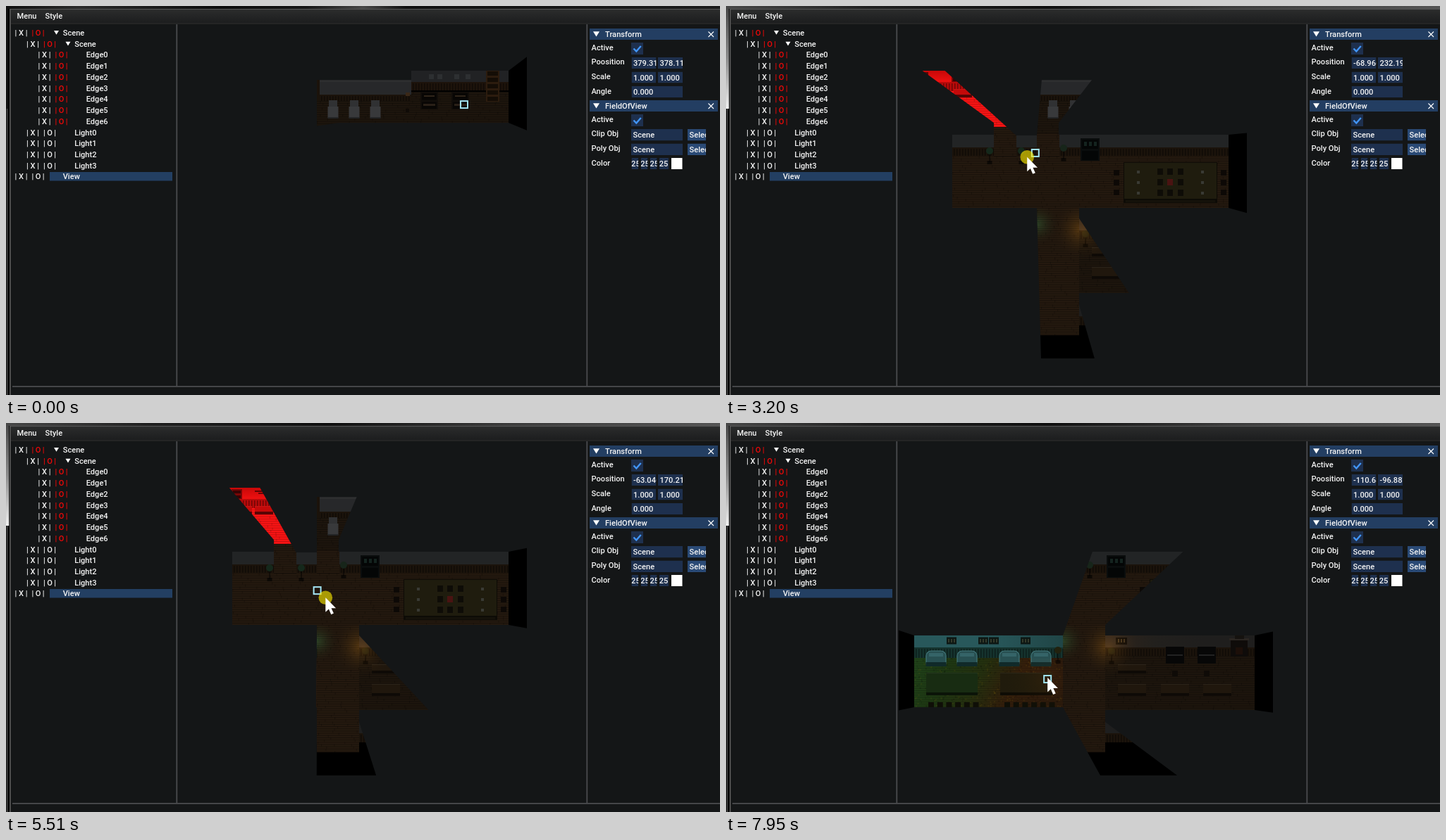
Write an HTML page with a canvas that moves like this. It is 1013 by 553 pixels and loops after 8 s.

```html
<!DOCTYPE html>
<html lang="en">
<head>
<meta charset="utf-8">
<title>Field of view editor</title>
<style>
  html, body { margin: 0; width: 100%; height: 100%; overflow: hidden; background: #141617; }
  canvas, #ui { position: absolute; left: 0; top: 0; width: 1013px; height: 553px; }
  text { font: 500 11.1px Roboto, sans-serif; fill: #f4f4f4; white-space: pre; }
</style>
</head>
<body>
<canvas id="view" width="1013" height="553"></canvas>
<svg id="ui" viewBox="0 0 1013 553"></svg>
<script>
const LOOP = 8000, W = 1013, H = 553;

/* ---------- interface ---------- */
const rect = (x, y, w, h, fill) => `<rect x="${x}" y="${y}" width="${w}" height="${h}" fill="${fill}"/>`;
const label = (x, y, s, extra = '') => `<text x="${x}" y="${y}" ${extra}>${s}</text>`;
const field = (x, y, w, h, s, fill = '#1e304e', id = '') =>
  `<svg x="${x}" y="${y}" width="${w}" height="${h}">${rect(0, 0, w, h, fill)}` +
  label(2.5, h / 2 + 4.2, s, id && `id="${id}"`) + '</svg>';
const arrow = (x, y, r = 3.5) => `<path d="M${x - r} ${y - r * .75}h${2 * r}l${-r} ${r * 1.6}z" fill="#fff"/>`;
const check = (y) => rect(887, y, 17, 17, '#1e304e') +
  `<path d="M890.5 ${y + 8.5}l3.8 4 6.5-7.5" fill="none" stroke="#4296fa" stroke-width="2.4"/>`;

function bars(x, letter, y, red) {
  const c = `text-anchor="middle"` + (red ? ' style="fill:#f00808"' : '');
  return label(x, y, '|', c) + label(x + 7.6, y, letter, c) + label(x + 15.2, y, '|', c);
}

function tree() {
  const rows = [['Scene', 0, 1], ['Scene', 1, 1]];
  for (let i = 0; i < 7; i++) rows.push(['Edge' + i, 2, 1]);
  for (let i = 0; i < 4; i++) rows.push(['Light' + i, 1, 0]);
  rows.push(['View', 0, 0]);
  return rect(62, 236, 174, 12.5, '#233f62') + rows.map(([name, depth, red], i) => {
    const y = 42 + i * 15.73, x = depth * 16.5;
    return bars(14 + x, 'X', y, false) + bars(38 + x, 'O', y, red) +
      (i < 2 ? arrow(71.5 + x, y - 4.3) : '') + label(80.7 + x, y, name);
  }).join('');
}

function header(y, name) {
  return rect(828, y, 182, 16, '#233e62') + arrow(837.5, y + 7.6, 4.5) + label(850, y + 12.3, name) +
    `<path d="M996.5 ${y + 4.5}l7.5 7.5m0-7.5l-7.5 7.5" stroke="#fff" stroke-width="1.1"/>`;
}

function panel() {
  const names = [['Active', 62.7], ['Poosition', 83], ['Scale', 104], ['Angle', 125],
    ['Active', 164.5], ['Clip Obj', 185.2], ['Poly Obj', 206], ['Color', 226.5]];
  let s = header(32, 'Transform') + header(134, 'FieldOfView') + check(52) + check(154);
  s += names.map(([n, y]) => label(830.5, y, n)).join('');
  s += field(887.5, 73, 35, 16, '', undefined, 'px') + field(925, 73, 35, 16, '', undefined, 'py');
  s += field(887.5, 93.5, 34.5, 16, '1.000') + field(925, 93.5, 35, 16, '1.000');
  s += field(887.5, 114, 72.5, 16, '0.000');
  for (const y of [175, 195.5])
    s += field(887, y, 73, 16.5, 'Scene') + field(967, y, 26, 16.5, 'Select', '#2a4a76');
  for (const x of [887.5, 900.7, 913.9, 927.1]) {
    const w = x > 920 ? 13 : 9.7;
    s += `<svg x="${x}" y="216" width="${w}" height="16">${rect(0, 0, w, 16, '#1e304e') + label(-.4, 12.2, '255')}</svg>`;
  }
  return s + rect(944, 216, 15.5, 16, '#fff');
}

const stops = (list) => list.map(([o, c]) => `<stop offset="${o}" stop-color="${c}"/>`).join('');
const ui = document.getElementById('ui');
ui.innerHTML = `<defs>
  <linearGradient id="bar" x2="0" y2="1">${stops([[0, '#2b2c2c'], [1, '#1c1d1e']])}</linearGradient>
  <linearGradient id="early">${stops([[0, '#101010'], [.1, '#2b2b2b'], [.3, '#0c0c0c'], [.42, '#161616'], [.5, '#484848'], [.56, '#111'], [1, '#1b1b1b']])}</linearGradient>
  <linearGradient id="late">${stops([[0, '#484848'], [.2, '#202020'], [.45, '#0f0f0f'], [.7, '#3c3c3c'], [1, '#555']])}</linearGradient>
  <linearGradient id="glow" x2="0" y2="1">${stops([[0, '#484848'], [.5, '#8c8c8c'], [1, '#f0f0f0']])}</linearGradient></defs>` +
  rect(0, 0, 7, H, '#111') + rect(0, 0, W, 5, 'url(#early)') +
  rect(3.5, 4, 1.5, H, '#000') +
  `<g id="back">${rect(0, 0, W, 4, 'url(#late)') + rect(0, 4, 4.2, 142, 'url(#glow)')}</g>` +
  rect(1, 146, 1.2, H, '#4d4d4d') + rect(5, 4, 1.8, H, '#555') +
  rect(5, 4, W, 1.5, '#555') + rect(7, 5.5, W, 19, 'url(#bar)') + rect(7, 24.5, W, 1, '#333') +
  label(15.5, 18.3, 'Menu') + label(55.5, 18.3, 'Style') +
  rect(241.4, 26, 1.8, 514, '#4a4b4e') + rect(823.4, 26, 1.8, 514, '#4a4b4e') +
  rect(9, 540, W, 1.8, '#4a4b4e') + tree() + panel() +
  `<rect id="mark" x="-5" y="-5" width="10" height="10" fill="none" stroke="#a4e6f6" stroke-width="2"/>
  <g id="mouse"><circle id="press" r="9.8" fill="#ffee00" fill-opacity=".62"/>
  <path d="M0 0V20.5L4.6 16.2 8 24 11.6 22.4 8.2 15H14.8Z" fill="#fff"/></g>`;
const $ = (id) => document.getElementById(id);

/* ---------- floor plan ---------- */
const plan = document.createElement('canvas');
plan.width = W; plan.height = H;
const g = plan.getContext('2d');
let seed = 7;
const rnd = () => (seed = (seed * 16807) % 2147483647) / 2147483647;
const box = (c, x, y, w, h) => { g.fillStyle = c; g.fillRect(x, y, w, h); };
const each = (list, fn) => list.forEach(fn);

function grad(x0, y0, x1, y1, list) {
  const f = g.createLinearGradient(x0, y0, x1, y1);
  list.forEach((c, i) => f.addColorStop(i / (list.length - 1), c));
  return f;
}
function floor(c, x, y, w, h, a = .3) {
  box(c, x, y, w, h);
  for (let r = 0; r < h; r += 3.2) {
    box(`rgba(0,0,0,${a})`, x, y + r, w, 1);
    for (let k = rnd() * 30; k < w; k += 18 + rnd() * 30) box(`rgba(0,0,0,${a * .8})`, x + k, y + r, 1, 3);
  }
}
function rail(c, x, y, w, h) {
  box(c, x, y, w, h);
  for (let k = 2; k < w; k += 4) box('rgba(0,0,0,.4)', x + k, y + 2, 1.5, h - 2);
}
function shelf(c, x, y, w, h, n = 3) {
  box(c, x, y, w, h);
  for (let i = 0; i < n; i++) box('rgba(0,0,0,.55)', x + 2, y + 2 + i * h / n, w - 4, h / n - 3);
}
function bench(c, x, y, w, h) {
  box(c, x, y, w, h);
  box('rgba(0,0,0,.55)', x, y + h - 4, w, 4);
  box('rgba(255,255,255,.05)', x, y, w, 1);
}
function plant(c, x, y) {
  box('rgba(0,0,0,.6)', x - 3.5, y + 14, 7, 5);
  box('rgba(0,0,0,.45)', x - 1, y, 2, 16);
  g.fillStyle = c;
  g.beginPath(); g.ellipse(x, y, 5, 5, 0, 0, 7); g.fill();
}
function bed(x) {
  g.beginPath();
  g.roundRect(x - 14, 324, 28, 19, [7, 7, 2, 2]);
  g.fillStyle = '#285052'; g.fill();
  g.strokeStyle = '#42767a'; g.lineWidth = 1.2; g.stroke();
  box('#356468', x - 10, 327, 20, 5);
  box('#102a29', x - 14.5, 340, 29, 6);
}
function light(x, y, r, c, clip) {
  const f = g.createRadialGradient(x, y, 0, x, y, r);
  f.addColorStop(0, c); f.addColorStop(1, 'rgba(0,0,0,0)');
  g.globalCompositeOperation = 'lighter';
  box(f, ...clip);
  g.globalCompositeOperation = 'source-over';
}

function drawPlan() {
  const wood = '#24190f', dim = '#1d150d', slat = '#1b130b';
  box('#000', 200, 50, 545, 460);

  // upper right room
  floor(dim, 441, 122, 272, 62);
  box(slat, 441, 105, 4, 29);
  box('#27282a', 445, 105, 130, 21); box('#2e2f30', 445, 106, 130, 2);
  rail(slat, 445, 126, 130, 9);
  box('#212224', 575, 92, 138, 17); rail('#1d130b', 575, 108, 138, 12);
  each([600, 612, 636, 652], x => box('#2d2f31', x, 97, 7, 7));
  each([464, 494, 524], x => {
    box('#303133', x - 6, 134, 12, 10); box('#38393b', x - 7.5, 143, 15, 16); box('#232426', x - 7.5, 158, 15, 2);
  });
  each([588, 632], x => { shelf('#110d09', x, 122, 25, 25, 2); box('#30251a', x + 5, 127, 15, 2); box('#2a2017', x + 4, 139, 17, 3); });
  shelf('#2c1c0e', 681, 91, 19, 45, 5);
  box('#3a2818', 567, 123, 6, 5); box('#100b07', 567, 146, 5, 5);

  // red room
  floor('#fa1414', 230, 120, 195, 52, .22);
  box(grad(230, 92, 230, 110, ['#c80808', '#f41212']), 230, 92, 195, 18);
  rail('#b80a0a', 230, 108, 195, 13);
  each([248, 277], x => shelf('#5c0505', x, 94, 10, 10, 1));
  shelf('#7a0606', 320, 94, 15, 14, 2);
  box('#5c0404', 353, 96, 28, 2); box('#6d0505', 358, 99, 18, 2);
  each([275, 323, 353], x => bench('#c40a0a', x, 118, 26, 12));
  shelf('#680505', 399, 97, 25, 33, 4);
  plant('#8a0606', 418, 145);
  floor(wood, 380, 172, 32, 13);

  // hall
  floor(wood, 321, 204, 392, 98);
  each([[321, 59], [412, 29], [473, 240]], ([x, w]) => { box('#222425', x, 181, w, 21); rail(slat, x, 201, w, 12); });
  floor(wood, 380, 181, 32, 32); floor(wood, 441, 181, 32, 32);
  each([374, 419], x => plant('#15281b', x, 206));
  plant('#17251a', 479, 202);
  shelf('#0a0d0d', 503, 188, 27, 32, 2);
  each([508, 515, 522], x => box('#14231f', x, 193, 4, 6));
  each([237, 251, 265], y => each([550, 702], x => box('#0d0906', x, y - 4, 8, 8)));
  box('#0d0b06', 564, 222, 133, 58); box('#1f1c0e', 565, 223, 131, 51);
  box('#15120a', 567, 276, 127, 3);
  each([236, 251, 266], (y, j) => {
    each([616, 630, 645], (x, i) => box(i == 1 && j == 1 ? '#4a1312' : '#0e0c07', x - 4, y - 5, 8, 9));
    each([585, 676], x => box('#393a34', x - 2, y - 2, 4, 4));
  });

  // corridor
  floor(wood, 441, 287, 60, 181);

  // lower left room
  floor(grad(230, 335, 400, 420, ['#20431a', '#1e3813', '#25300f', '#331e0b', '#2a1a0c']), 230, 332, 211, 72, .18);
  for (let i = 0; i < 420; i++)
    box(i % 2 ? 'rgba(150,120,20,.13)' : 'rgba(0,0,0,.18)', 230 + rnd() * 210, 334 + rnd() * 69, 2, 2);
  box(grad(230, 0, 441, 0, ['#28585b', '#28585b', '#204546']), 230, 302, 211, 19);
  rail('#15332e', 230, 319, 211, 15);
  each([276, 321, 336, 381], x => { box('#0d1714', x, 304.5, 14, 10); each([2, 6, 10], k => box('#33392a', x + k, 307, 2, 5)); });
  each([261, 305, 365, 410], bed);
  bench('#182c12', 247, 355, 73, 32); bench('#201b0c', 352, 355, 74, 32);
  each([253, 361], x => { for (let i = 0; i < 6; i++) box('#0f0f07', x + i * 12.7 - 3, 397, 8, 7); });
  plant('#22220f', 434, 323);

  // lower right room
  floor(dim, 501, 328, 212, 80);
  box(grad(501, 0, 640, 0, ['#30241a', '#22201d', '#1f1e1d']), 501, 302, 212, 18);
  rail(slat, 501, 319, 212, 12);
  box('#120d08', 516, 305, 16, 10); each([519, 523, 527], x => box('#40311c', x, 307, 2, 5));
  plant('#1c190c', 510, 324);
  each([587, 632], x => { box('#070707', x, 318, 26, 24); box('#222', x + 2, 329, 22, 2); });
  each([600, 645], x => box('#0f0b07', x - 4, 352, 8, 8));
  box('#0f0c0a', 679, 307, 24, 25); box('#2a2521', 677, 306, 28, 3); box('#1c0f09', 686, 319, 10, 10);
  box('#15120f', 685, 302, 13, 5);
  bench('#20170d', 519, 343, 40, 13);
  each([519, 580, 640], x => bench('#20170d', x, 371, 40, 17));

  // lower strip
  each([[208, 233], [501, 238]], ([x, w]) => { box('#1e1e1e', x, 425, w, 17); rail(slat, x, 441, w, 13); });

  light(441, 310, 32, 'rgba(20,75,42,.55)', [441, 287, 60, 70]);
  light(504, 318, 42, 'rgba(110,68,8,.5)', [455, 287, 46, 80]);
  light(506, 320, 44, 'rgba(95,58,10,.45)', [501, 302, 60, 70]);
  light(420, 365, 65, 'rgba(70,26,0,.2)', [330, 335, 111, 69]);
}
drawPlan();

/* ---------- visibility ---------- */
const walls = [
  [208, 60, 739, 60, 739, 501, 208, 501, 208, 60],
  [230, 92, 425, 92, 425, 166, 411.5, 166, 411.5, 184, 441, 184, 441, 105, 575, 105, 575, 92, 713, 92],
  [713, 166, 472, 166, 472, 183, 713, 183],
  [230, 166, 380, 166, 380, 183, 321, 183, 321, 287, 441, 287, 441, 302, 230, 302],
  [713, 287, 501, 287, 501, 302, 713, 302],
  [230, 404, 441, 404, 441, 425, 230, 425],
  [713, 408, 501, 408, 501, 425, 713, 425]
];
const edges = walls.flatMap(p => {
  const out = [];
  for (let i = 0; i + 3 < p.length; i += 2) out.push(p.slice(i, i + 4));
  return out;
});

function cast(x, y, a) {
  const dx = Math.cos(a), dy = Math.sin(a);
  let best = 900;
  for (const [x0, y0, x1, y1] of edges) {
    const ex = x1 - x0, ey = y1 - y0, d = dx * ey - dy * ex;
    if (Math.abs(d) < 1e-9) continue;
    const t = ((x0 - x) * ey - (y0 - y) * ex) / d;
    const u = ((x0 - x) * dy - (y0 - y) * dx) / d;
    if (t > 0 && t < best && u >= -1e-7 && u <= 1 + 1e-7) best = t;
  }
  return [x + dx * best, y + dy * best];
}
function sight(x, y) {
  const angles = edges.flatMap(([a, b, c, d]) =>
    [Math.atan2(b - y, a - x), Math.atan2(d - y, c - x)].flatMap(v => [v - 1e-4, v, v + 1e-4]));
  return angles.sort((a, b) => a - b).map(a => cast(x, y, a));
}

/* ---------- motion ---------- */
// time, then position in scene units
const drag = [
  [820, 379.312, 378.112], [920, 379.312, 378.112], [1380, 264.312, 366.445], [2300, 6, 348],
  [2500, -14.012, 341.445], [2950, -28, 272], [3300, -88, 219], [3600, -143, 198],
  [3900, -154.02, 243.112], [4330, -173, 366], [4740, -164.02, 306.445], [5100, -151, 226],
  [5600, -45, 154], [5900, -8, 62], [6210, -0.685, -11.887], [6430, -8, -44],
  [6700, -66, -80], [7120, -110.685, -96.887]
];
// time, then stage position
const enter = [[70, 905, 440], [210, 868, 380], [330, 808, 276], [430, 748, 192], [500, 690, 152], [560, 650, 140]];

function along(keys, t) {
  const n = keys.length - 1;
  if (t <= keys[0][0]) return keys[0].slice(1);
  if (t >= keys[n][0]) return keys[n].slice(1);
  const i = keys.findIndex(k => k[0] > t) - 1, a = keys[i], b = keys[i + 1];
  const span = b[0] - a[0], u = (t - a[0]) / span;
  const slope = (j, c) => j <= 0 || j >= n ? 0 :
    (keys[j + 1][c] - keys[j - 1][c]) / (keys[j + 1][0] - keys[j - 1][0]);
  return [1, 2].map(c => {
    const m0 = slope(i, c) * span, m1 = slope(i + 1, c) * span, d = b[c] - a[c];
    return a[c] + u * (m0 + u * (3 * d - 2 * m0 - m1 + u * (m0 + m1 - 2 * d)));
  });
}
const toStage = ([x, y]) => [471.3 + x * .471, 318.4 - y * .4715];
const snap = (t) => {
  const start = t < 820 ? 0 : t < 7320 ? 820 : 7320;
  return start + Math.floor((t - start) / 70) * 70;
};
function pointer(t) {
  if (t < 820) return along(enter, t);
  const [x, y] = toStage(along(drag, t + 130));
  return [x, y - 2];
}

const ctx = $('view').getContext('2d');
function draw(time) {
  const t = snap(time);
  const pos = along(drag, t), [x, y] = toStage(pos);
  const p = Math.min(1, Math.max(0, (t - 7250) / 700)), pan = 37 * p * p * (3 - 2 * p);

  ctx.fillStyle = '#141617';
  ctx.fillRect(0, 0, W, H);
  ctx.save();
  ctx.beginPath(); ctx.rect(245, 27, 578, 513); ctx.clip();
  ctx.translate(pan, 0);
  ctx.beginPath();
  sight(x, y).forEach(([a, b]) => ctx.lineTo(a, b));
  ctx.closePath(); ctx.clip();
  ctx.drawImage(plan, 0, 0);
  ctx.restore();

  // the handle trails the pointer a little
  const [mx, my] = pointer(t);
  $('mark').setAttribute('transform', `translate(${x + pan} ${y})`);
  $('mouse').setAttribute('transform', `translate(${mx + pan} ${my})`);
  $('mouse').style.display = t < 70 ? 'none' : '';
  $('press').style.display = t >= 820 && t < 7120 ? '' : 'none';
  $('back').style.display = t >= 820 ? '' : 'none';
  $('px').textContent = pos[0].toFixed(3);
  $('py').textContent = pos[1].toFixed(3);
}

const begin = performance.now();
function tick() {
  draw((performance.now() - begin) % LOOP);
  requestAnimationFrame(tick);
}
tick();
</script>
</body>
</html>
```
